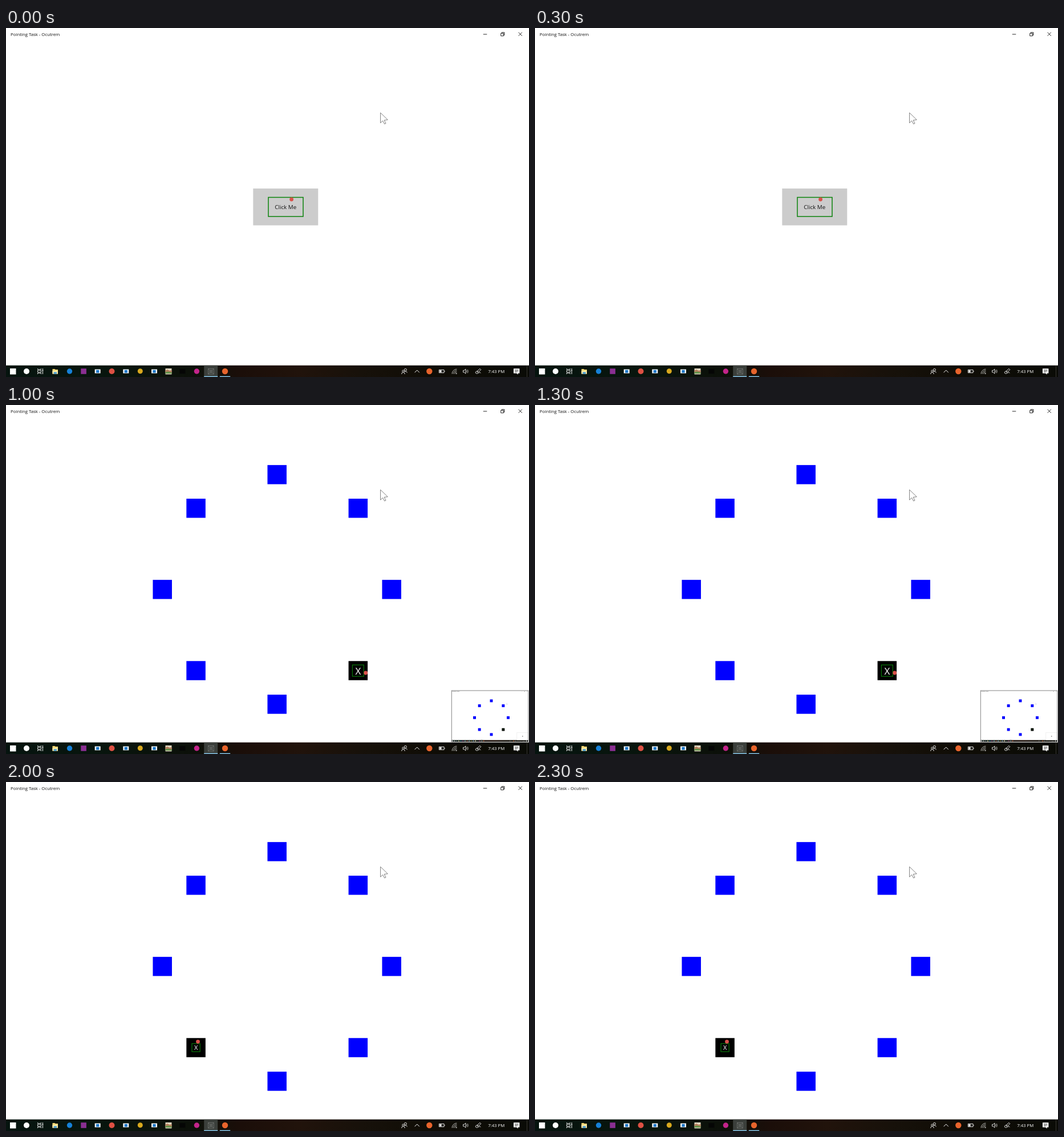
Recreate the animation shown at these times as an HTML page. Size 917 px wide and 611 px high, loop 2.5 s.

```html
<!DOCTYPE html>
<html lang="en">
<head>
<meta charset="utf-8">
<title>Pointing Task</title>
<style>
html, body { margin: 0; width: 100%; height: 100%; overflow: hidden; background: #fff; }
svg { display: block; width: 917px; height: 611px; font-family: "Open Sans", "Noto Sans", sans-serif; }
</style>
</head>
<body>
<svg id="stage" viewBox="0 0 917 611">
  <defs>
    <linearGradient id="bar">
      <stop offset="0" stop-color="#06140f"/>
      <stop offset=".2" stop-color="#08150d"/>
      <stop offset=".36" stop-color="#0c1009"/>
      <stop offset=".45" stop-color="#1b0e09"/>
      <stop offset=".56" stop-color="#21130b"/>
      <stop offset=".68" stop-color="#17110a"/>
      <stop offset=".8" stop-color="#100d06"/>
      <stop offset="1" stop-color="#0a0b06"/>
    </linearGradient>
    <g id="app">
      <path d="M-5-3.5H5V3.5H-5Z" fill="#f4f8fb"/>
      <path d="M-2.6-2.2H2.6V2.6H-2.6Z" fill="#1976c8"/>
    </g>
    <g id="desk">
      <text x="8" y="14" font-size="7.8" fill="#111">Pointing Task - Ocutrem</text>
      <g fill="none" stroke="#111" stroke-width=".9">
        <path d="M836.8 11H843.3M898.6 7.6L904.8 13.8M904.8 7.6L898.6 13.8"/>
        <path d="M867.7 9.3H872.4V13.9H867.7ZM869.2 9V7.8H873.9V12.4H872.6"/>
      </g>
      <rect y="590.7" width="917" height="20.3" fill="url(#bar)"/>
      <g id="tasks">
        <rect x="7" y="596" width="10.5" height="10.5" fill="#fff"/>
        <circle cx="36" cy="601" r="5" fill="#fff"/>
        <g fill="none" stroke="#f2f2f2">
          <path d="M55.5 596.2V597.8H61.5V596.2M55.5 606V604.2H61.5V606M55.5 599.3H61.5V602.7H55.5Z" stroke-width=".9"/>
          <path d="M64.4 596V606M63.4 599.5H65.4" stroke-width="1"/>
        </g>
        <path d="M81.5 597H85.5L86.5 598H91V605.5H81.5Z" fill="#f7d774"/>
        <path d="M81.5 600H91V605.5H81.5Z" fill="#fbe9a4"/>
        <path d="M83.6 602.5H89V605.5H83.6Z" fill="#3f9bd8"/>
        <circle cx="111.5" cy="601" r="4.7" fill="#1681d8"/>
        <rect x="131.3" y="596.2" width="9.6" height="9.6" fill="#8a2f92"/>
        <use href="#app" x="160.7" y="601"/>
        <circle cx="185.5" cy="601" r="5" fill="#dd5144"/>
        <use href="#app" x="210.3" y="601"/>
        <circle cx="235.3" cy="600.8" r="4.5" fill="#d9a91e"/>
        <use href="#app" x="260" y="601"/>
        <rect x="279.5" y="596" width="11" height="10.4" fill="#dfd6c0"/>
        <path d="M279.5 599.5L283 598L287 600L290.5 599V603H279.5Z" fill="#b5805d"/>
        <path d="M279.5 602.4L284 601.5L290.5 603V605H279.5Z" fill="#63934b"/>
        <rect x="304.4" y="597.2" width="10" height="8" fill="#050605"/>
        <circle cx="334.4" cy="601" r="4.7" fill="#c3248a"/>
        <rect x="347.2" y="590.7" width="24" height="20.3" fill="#3b3f3b"/>
        <g fill="none" stroke="#858885" stroke-width=".6">
          <path d="M354.5 596.5H364.3V606H354.5ZM354.5 596.5L364.3 606M364.3 596.5L354.5 606"/>
          <circle cx="359.4" cy="601.2" r="2.4"/>
        </g>
        <path d="M347.2 609.4H371.2V611H347.2ZM374.8 609.4H393.2V611H374.8Z" fill="#84c3e6"/>
        <circle cx="384" cy="601" r="5.2" fill="#e8642c"/>
      </g>
      <g fill="none" stroke="#f2f2f2" stroke-width=".9">
        <circle cx="700.4" cy="598.4" r="2"/>
        <circle cx="696.4" cy="600.7" r="1.7"/>
        <path d="M693.6 606Q693.8 602.6 696.5 602.6T699.2 606M698.6 601.6Q702.6 600 703.2 603.4"/>
        <path d="M716.6 603.2L720.7 599L724.8 603.2" stroke-width="1"/>
        <path d="M759.3 598.4H768V603.6H759.3ZM769 600V602"/>
        <path d="M782 605.5A8.5 8.5 0 0 1 790.4 597.2M784.2 605.5A6.2 6.2 0 0 1 790.4 599.6M786.4 605.5A4 4 0 0 1 790.4 601.9" stroke="#c9c9c6"/>
        <path d="M801.6 599.4H803.4L806 597V605.2L803.4 602.8H801.6Z"/>
        <path d="M807.6 599.3Q808.8 601.1 807.6 602.9M809.3 598Q811.2 601.1 809.3 604.2" stroke-width=".7"/>
        <path d="M826.3 602.5L827 600L831 596.4L832.8 598.2L829 602Z"/>
        <path d="M827 600.6Q822.6 601 823.4 604Q825.4 606.4 828.2 604T832.4 604"/>
      </g>
      <circle cx="742.3" cy="601" r="5.2" fill="#e8642c"/>
      <path d="M760.2 599.3H763.6V602.7H760.2ZM788.7 605.7V604.4L790.4 603.8V605.7Z" fill="#f2f2f2"/>
      <text x="845.2" y="604.1" font-size="7.75" fill="#fff">7:43 PM</text>
      <path d="M890 596.2H900.4V604.4H897.6V606.8L895.2 604.4H890Z" fill="#fff"/>
      <path d="M892 598.7H898.4M892 600.5H898.4M892 602.3H896.5" stroke="#222" stroke-width=".7"/>
      <path d="M913.5 591V611" stroke="#4b4b45" stroke-width=".7"/>
    </g>
    <path id="pointer" d="M656.6 148.4V166.2L660.6 162.4L663.7 168.1L666 167L663.2 161.4L669.3 160.7Z" fill="#fff" stroke="#555" stroke-width=".75"/>
  </defs>
  <g id="view"></g>
</svg>
<script>
const view = document.getElementById('view');
const STEP = 500, W = 917, H = 611;
const GREEN = '#0b820b';

const rect = (x, y, w, h, attrs) =>
  `<rect x="${x}" y="${y}" width="${w}" height="${h}" ${attrs}/>`;
const fill = c => `fill="${c}"`;
const line = (c, w) => `fill="none" stroke="${c}" stroke-width="${w}"`;
const label = (x, y, size, color, s) =>
  `<text x="${x}" y="${y}" font-size="${size}" text-anchor="middle" fill="${color}">${s}</text>`;
const gaze = (x, y) => `<circle cx="${x}" cy="${y}" r="3.4" fill="#d9524b"/>`;

function button(edge) {
  return rect(433.3, 281, 114, 64.5, fill('#ccc')) +
    rect(460, 296.5, 61, 33.5, line(edge, 1.5)) +
    label(490.2, 317.3, 9.85, '#111', 'Click Me');
}

// focus ring is centred on the pad
function pad(ring) {
  return rect(433.3, 281, 50.3, 50.3, fill('#0066ff')) +
    rect(458.6 - ring / 2, 306.4 - ring / 2, ring, ring, line('#087d3a', 1.6));
}

// eight targets on a circle; index counts clockwise from the right
function targets(active, ring, size) {
  const side = 33.5;
  let out = '';
  for (let i = 0; i < 8; i++) {
    const a = i * Math.PI / 4;
    const x = 475.2 + 201 * Math.cos(a), y = 322.9 + 201 * Math.sin(a);
    out += rect(x - side / 2, y - side / 2, side, side, fill(i === active ? '#000' : '#00f'));
    if (i === active) {
      out += rect(x - ring / 2, y - ring / 2, ring, ring, line(GREEN, 1.1)) +
        label(x, y + size * .36 + .4, size, '#fff', 'X');
    }
  }
  return out;
}

function screen(content, extra = '') {
  return rect(0, 0, W, H, fill('#fff')) + '<use href="#desk"/>' + content + extra +
    '<use href="#pointer"/>';
}

function preview(content) {
  const k = 134.5 / W;
  return `<g transform="translate(781.3 500) scale(${k})">${content}</g>` +
    rect(781.3, 500, 134.5, 89.6, line('#777', .9));
}

const nested = rect(781, 500, 135, 89, 'fill="#fff" stroke="#ddd" stroke-width="3"') +
  rect(843, 540, 10, 10, fill('#777'));
const ring2 = targets(1, 20, 17);

const scenes = [
  screen(button(GREEN), gaze(500.6, 300)),
  screen(pad(20.7), gaze(473.9, 288.2) + preview(screen(button('#888')))),
  screen(ring2, gaze(630.7, 469) + preview(screen(ring2, nested))),
  screen(pad(43.5), gaze(462.4, 290.3)),
  screen(targets(3, 14.2, 11), gaze(336.5, 454.6))
];

let shown = -1;
function draw(now) {
  const i = Math.floor(now / STEP) % scenes.length;
  if (i !== shown) view.innerHTML = scenes[shown = i];
}

const start = performance.now();
function tick() {
  draw(performance.now() - start);
  requestAnimationFrame(tick);
}
tick();
</script>
</body>
</html>
```
